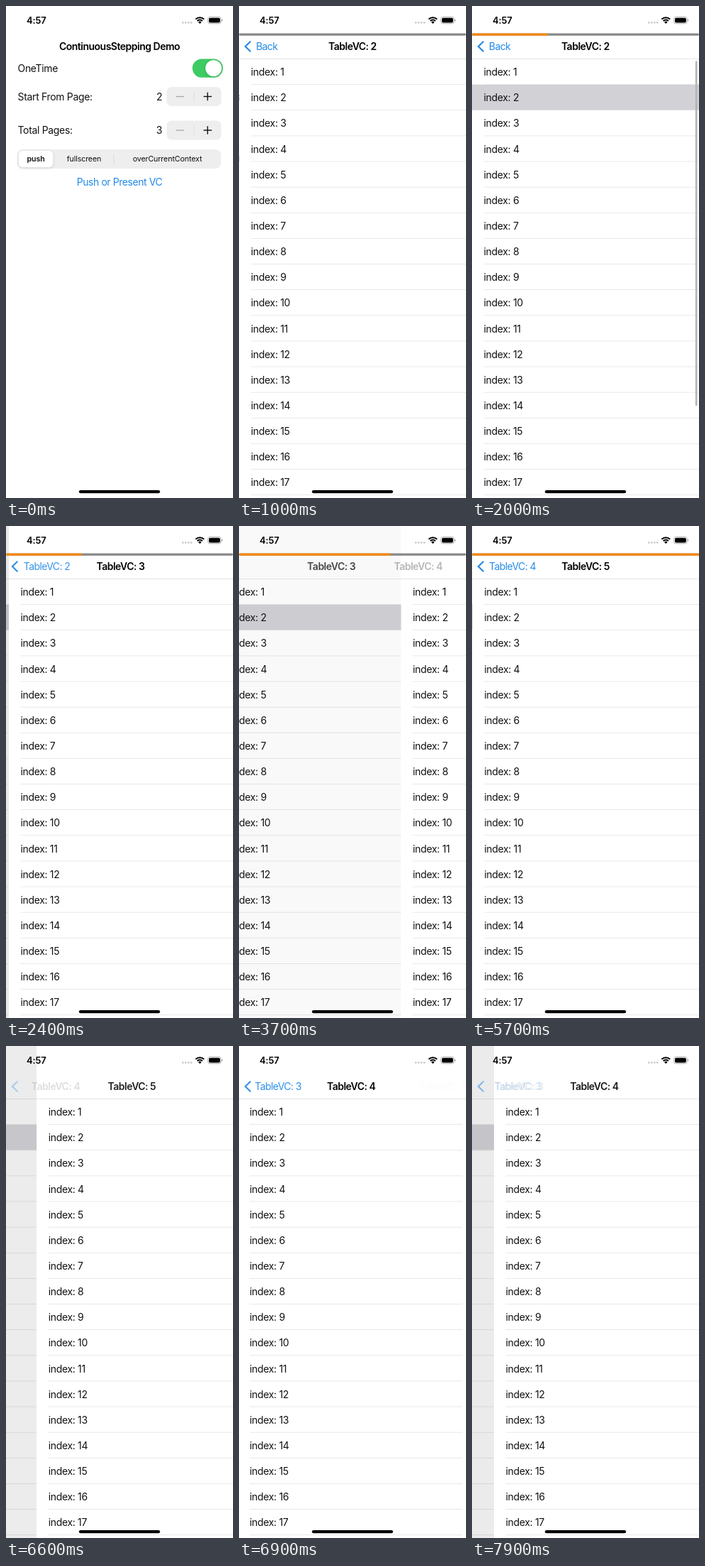
These frames come from a looping animation (320 by 693 pixels, 8 s). An HTML page with a canvas:

```html
<!DOCTYPE html>
<html lang="en">
<head>
<meta charset="utf-8">
<title>Navigation stack</title>
<style>
  html, body { margin: 0; width: 100%; height: 100%; overflow: hidden; background: #fff; }
  canvas { display: block; width: 100vw; height: 100vh; }
</style>
</head>
<body>
<canvas id="stage"></canvas>
<script>
const W = 320, H = 693, LOOP = 8000, STEP = 100;
const BLUE = '#2089e8', ORANGE = '#f98a0f', INK = '#111', PANEL = '#eeeeef';
const ROW = 36.13, LIST_TOP = 74.5;

// Pages are numbered by depth; page 1 is the settings screen.
const moves = [
  { at: 493, from: 1, to: 2 },
  { at: 2050, from: 2, to: 3 },
  { at: 3642, from: 3, to: 4 },
  { at: 5245, from: 4, to: 5 },
  { at: 6565, from: 5, to: 4 },
  { at: 7871.4, from: 4, to: 3 }
];
const BAR_SHOWN = moves[0].at, BAR_HIDDEN = moves[4].at;

const canvas = document.getElementById('stage');
const ctx = canvas.getContext('2d');

const clamp = v => Math.max(0, Math.min(1, v));
const mix = (a, b, k) => a + (b - a) * k;
const smooth = v => { v = clamp(v); return v * v * (3 - 2 * v); };

// Critically damped spring, t in ms.
function spring(t) {
  const x = 18.26 * Math.max(0, t) / 1000;
  return 1 - (1 + x) * Math.exp(-x);
}

function faded(alpha, draw) {
  if (alpha <= 0) return;
  ctx.save();
  ctx.globalAlpha *= clamp(alpha);
  draw();
  ctx.restore();
}

function shadowed(draw) {
  ctx.save();
  ctx.shadowColor = 'rgba(0,0,0,.14)';
  ctx.shadowBlur = 4;
  ctx.shadowOffsetY = 1;
  draw();
  ctx.restore();
}

function rect(x, y, w, h, color) {
  ctx.fillStyle = color;
  ctx.fillRect(x, y, w, h);
}

function pill(x, y, w, h, r, color) {
  ctx.fillStyle = color;
  ctx.beginPath();
  ctx.roundRect(x, y, w, h, r);
  ctx.fill();
}

function disc(x, y, r, color) {
  ctx.fillStyle = color;
  ctx.beginPath();
  ctx.arc(x, y, r, 0, 7);
  ctx.fill();
}

function text(str, x, y, { size = 14, weight = 400, color = INK, align = 'left', gap = -0.33 } = {}) {
  ctx.font = `${weight} ${size}px Inter, "Open Sans", sans-serif`;
  ctx.letterSpacing = gap + 'px';
  ctx.textAlign = align;
  ctx.fillStyle = color;
  ctx.fillText(str, x, y);
}

function stepper(y, value) {
  text(value, 216, y + 5, { align: 'center' });
  pill(226.5, y - 13.5, 77, 27, 7, PANEL);
  rect(264.5, y - 7, 1, 14, '#dcdcde');
  rect(239.5, y - 0.6, 11.5, 1.3, '#a9a9ab');
  rect(278.5, y - 0.7, 11.5, 1.4, INK);
  rect(283.5, y - 5.8, 1.4, 11.5, INK);
}

function settingsPage() {
  text('OneTime', 16.5, 93);
  pill(262.8, 74.4, 43, 26.4, 13.2, '#3ecb63');
  shadowed(() => disc(292.6, 87.6, 11.4, '#fff'));

  text('Start From Page:', 16.5, 133);
  stepper(127.5, '2');
  text('Total Pages:', 16.5, 180);
  stepper(175, '3');

  pill(16, 202, 287, 27, 7.5, PANEL);
  shadowed(() => pill(17.7, 203.8, 48.6, 23.4, 6, '#fff'));
  rect(151.5, 208.5, 1, 14, '#dadadc');
  const label = { size: 10.7, align: 'center', gap: -0.13 };
  text('push', 42, 219, { ...label, weight: 600 });
  text('fullscreen', 110, 219, label);
  text('overCurrentContext', 227.5, 219, label);

  text('Push or Present VC', 160, 253, { color: BLUE, align: 'center', gap: -0.43 });
}

function tablePage(selection, indicator) {
  const second = LIST_TOP + ROW;
  faded(selection, () => rect(0, second, W, ROW, '#d1d1d6'));
  rect(0, LIST_TOP - 0.5, W, 0.8, '#dfdfdf');
  for (let i = 1; i <= 17; i++) {
    const bottom = LIST_TOP + ROW * i;
    text('index: ' + i, 16.5, bottom - 12.4);
    rect(16.5, bottom - 0.4, W - 16.5, 0.8, '#e3e3e5');
  }
  faded(indicator, () => pill(314.9, 77.2, 2.6, 486, 1.3, '#b4b4b4'));
}

function page(depth, x, selection, indicator) {
  ctx.save();
  ctx.translate(x, 0);
  rect(0, 0, W, H, '#fff');
  if (depth === 1) settingsPage();
  else tablePage(selection, indicator);
  ctx.restore();
}

const titleOf = depth => depth === 1 ? 'ContinuousStepping Demo' : 'TableVC: ' + depth;
const backOf = depth => depth === 2 ? 'Back' : titleOf(depth - 1);

function navTitle(depth, x) {
  text(titleOf(depth), x, 62, { weight: 600, align: 'center', gap: -0.5, color: '#000' });
}

function backLabel(depth, x) {
  text(backOf(depth), x, 62, { color: BLUE, gap: -0.57 });
}

function chevron() {
  ctx.strokeStyle = BLUE;
  ctx.lineWidth = 2.1;
  ctx.lineCap = 'round';
  ctx.beginPath();
  ctx.moveTo(15.8, 50.3);
  ctx.lineTo(8.9, 57);
  ctx.lineTo(15.8, 63.7);
  ctx.stroke();
}

// cover: 0 shows the lower page only, 1 the upper page only.
function navBar(lower, upper, cover) {
  const open = 1 - cover;
  const backCenter = lower === 1 ? 41 : 56;
  faded(open, () => navTitle(lower, mix(159.8, backCenter, cover)));
  faded(cover, () => navTitle(upper, 159.8 + 130 * open));
  faded(1 - 8 * open, () => backLabel(upper, 23.8 + 77 * open));
  if (lower > 1) faded(1 - 4 * cover, () => backLabel(lower, 23.8 - 100 * cover));
  faded(Math.max(1 - 5 * open, lower > 1 ? 1 - 5 * cover : 0), chevron);
}

function progressBar(t) {
  if (t < BAR_SHOWN || t >= BAR_HIDDEN) return;
  let share = 0;
  for (const m of moves.slice(0, 3)) share += smooth((t - m.at - 590) / 250) / 3;
  pill(0, 38.4, W, 3.4, 1.7, '#888');
  if (share > 0) pill(0, 38.4, W * share, 3.4, [1.7, 0, 0, 1.7], ORANGE);
}

function statusBar() {
  text('4:57', 29, 24.8, { size: 13, weight: 600, gap: -0.2, color: '#000' });
  for (let i = 0; i < 4; i++) disc(249.3 + i * 4, 23.4, 1.3, '#c8c8c8');

  ctx.strokeStyle = '#000';
  ctx.lineWidth = 2;
  ctx.lineCap = 'butt';
  for (const r of [5.2, 8.4]) {
    ctx.beginPath();
    ctx.arc(273.3, 24.6, r, -Math.PI * 0.75, -Math.PI * 0.25);
    ctx.stroke();
  }
  ctx.fillStyle = '#000';
  ctx.beginPath();
  ctx.moveTo(273.3, 25);
  ctx.arc(273.3, 25, 3.2, -Math.PI * 0.75, -Math.PI * 0.25);
  ctx.fill();

  ctx.strokeStyle = '#a6a6a6';
  ctx.lineWidth = 0.9;
  ctx.beginPath();
  ctx.roundRect(284.6, 15.4, 18.6, 9.4, 2.9);
  ctx.stroke();
  pill(286, 16.8, 15.8, 6.6, 1.7, '#000');
  pill(304, 18.5, 1.2, 3.2, 0.6, '#a6a6a6');
}

function draw(t) {
  const index = moves.findLastIndex(m => m.at <= t);
  if (index < 0) {
    page(1, 0);
    navTitle(1, 160);
  } else {
    const { at, from, to } = moves[index];
    const next = moves[index + 1];
    const pushing = to > from;
    const lower = Math.min(from, to), upper = Math.max(from, to);
    const p = spring(t - at);
    const cover = pushing ? p : 1 - p;
    const edge = W * (1 - cover);
    const arriving = clamp((t - at - 600) / 280);
    // A row is pressed shortly before the next page comes in.
    const pressed = next && next.to > next.from && t >= next.at - 60 ? 1 : 0;

    page(lower, -0.3 * W * cover, pushing ? 1 : 1 - p, pushing ? 1 : arriving);
    rect(0, 0, edge, H, `rgba(0,0,0,${0.088 * cover})`);
    page(upper, edge, pushing ? pressed : 0, pushing ? arriving : 1);
    navBar(lower, upper, cover);
  }
  progressBar(t);
  statusBar();
  pill(102.9, 682, 114.2, 4.3, 2.15, '#000');
}

function fit() {
  const ratio = window.devicePixelRatio || 1;
  const w = Math.round(innerWidth * ratio), h = Math.round(innerHeight * ratio);
  if (canvas.width !== w || canvas.height !== h) {
    canvas.width = w;
    canvas.height = h;
  }
  ctx.setTransform(w / W, 0, 0, h / H, 0, 0);
}

const start = performance.now();
function tick() {
  const elapsed = (performance.now() - start) % LOOP;
  fit();
  // The picture advances ten times a second.
  draw(Math.floor(elapsed / STEP) * STEP);
  requestAnimationFrame(tick);
}
tick();
</script>
</body>
</html>
```
